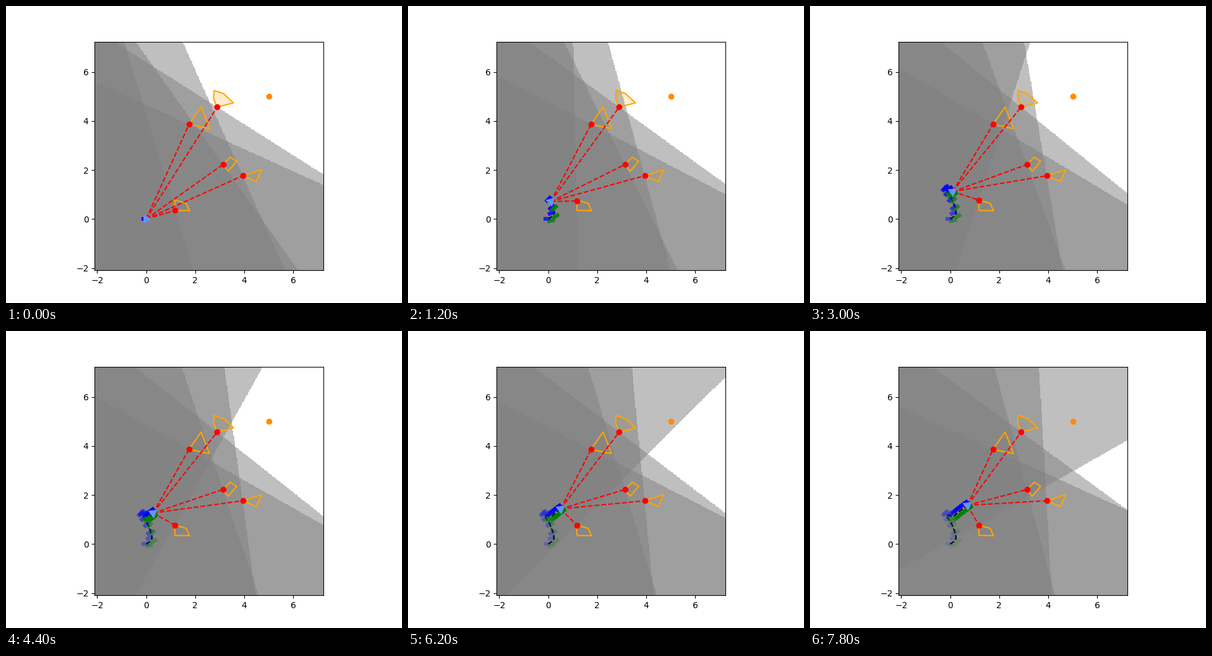
These frames come from a looping animation (640x480 px, 8 s). A matplotlib script:

```python
import numpy as np
import matplotlib.pyplot as plt
from matplotlib.animation import FuncAnimation
from matplotlib.patches import Polygon

FRAMES = 40
X0, Y0, SPAN = -2.105, -2.092, 9.327
GRID = 300

OBSTACLES = [np.array(p) for p in (
    [(1.174, .354), (1.762, .34), (1.632, .638), (1.164, .773)],
    [(3.934, 1.765), (4.716, 2.014), (4.489, 1.534)],
    [(3.127, 2.222), (3.426, 2.521), (3.685, 2.352), (3.346, 1.953)],
    [(1.747, 3.862), (2.24, 4.574), (2.579, 3.687)],
    [(2.892, 4.563), (3.556, 4.739), (3.152, 5.117), (2.773, 5.243),
     (2.748, 4.915)],
)]

# Step, x, y, heading in degrees: a curved sidestep, then a steady walk
KEYS = np.array([(0, 0, 0, 0), (3, .235, .22, 32), (6, .105, .715, 45),
                 (10, -.14, 1.155, 48), (15, .1, 1.12, 35),
                 (22, .28, 1.265, 37), (39, .705, 1.58, 37)])
FOOT_GAP = .13


def smooth(t, keys, values):
    """Cubic Hermite curve through the key points."""
    slopes = np.gradient(values, keys)
    j = np.clip(np.searchsorted(keys, t, side="right") - 1, 0, len(keys) - 2)
    h = keys[j + 1] - keys[j]
    u = (t - keys[j]) / h
    rise = u * u * (3 - 2 * u)
    return (values[j] * (1 - rise) + values[j + 1] * rise
            + h * u * (1 - u) * (slopes[j] * (1 - u) - slopes[j + 1] * u))


def turn(points, angle):
    c, s = np.cos(angle), np.sin(angle)
    return np.asarray(points) @ np.array([[c, s], [-s, c]])


def nearest(poly, p):
    d = np.roll(poly, -1, axis=0) - poly
    t = np.clip(((p - poly) * d).sum(1) / (d * d).sum(1), 0, 1)
    q = poly + t[:, None] * d
    return q[np.argmin(((q - p) ** 2).sum(1))]


steps = np.arange(FRAMES)
xs, ys, degrees = (smooth(steps, KEYS[:, 0], KEYS[:, c]) for c in (1, 2, 3))
body = np.column_stack([xs, ys])
heading = np.radians(degrees)

fig, ax = plt.subplots(figsize=(6.4, 4.8), dpi=100)
extent = (X0, X0 + SPAN, Y0, Y0 + SPAN)
gx, gy = np.meshgrid(np.linspace(*extent[:2], GRID),
                     np.linspace(*extent[2:], GRID))
shade = np.full((GRID, GRID, 4), .5)
image = ax.imshow(shade, extent=extent, origin="lower",
                  interpolation="nearest", zorder=1)
ax.axis(extent)
ax.set_xticks(range(-2, 7, 2))
ax.set_yticks(range(-2, 7, 2))

for poly in OBSTACLES:
    ax.add_patch(Polygon(poly, fc="orange", ec="none", alpha=.2, zorder=.5))
    ax.add_patch(Polygon(poly, fill=False, ec="orange", lw=1.5, zorder=2))
ax.plot(5, 5, "o", color="darkorange", zorder=3)

rays = [ax.plot([], [], "r--", zorder=3)[0] for _ in OBSTACLES]
dots = [ax.plot([], [], "ro", zorder=3.2)[0] for _ in OBSTACLES]
trail, = ax.plot([], [], "k--", zorder=3.5)

sole = np.array([(-.155, -.08), (.155, -.08), (.155, .08), (-.155, .08)])
feet = []
for k in steps:
    color, side = ("green", -1) if k % 2 else ("blue", 1)
    shift = (0, side * FOOT_GAP) if k else (-.04, 0)
    corners = body[k] + turn(sole + shift, heading[k])
    feet.append(ax.add_patch(Polygon(corners, fc=color, ec="none", zorder=4)))

angles = np.radians([0, 120, 240])
triangle = .225 * np.column_stack([np.cos(angles), np.sin(angles)])
robot = ax.add_patch(Polygon(triangle, fc="cornflowerblue", ec="none", zorder=6))


def update(i):
    p = body[i]
    layers = np.zeros((GRID, GRID))
    for poly, ray, dot in zip(OBSTACLES, rays, dots):
        q = nearest(poly, p)
        n = q - p
        layers += (gx - q[0]) * n[0] + (gy - q[1]) * n[1] <= 0
        ray.set_data([p[0], q[0]], [p[1], q[1]])
        dot.set_data([q[0]], [q[1]])
    shade[..., 3] = 1 - .5 ** layers
    image.set_data(shade)
    for k, foot in enumerate(feet):
        foot.set_visible(k <= i)
        foot.set_alpha(.95 ** max(i - k, 0))
    trail.set_data(body[:i + 1, 0], body[:i + 1, 1])
    robot.set_xy(p + turn(triangle, heading[i]))
    return []


anim = FuncAnimation(fig, update, frames=FRAMES, interval=200, repeat=True)
plt.show()
```
